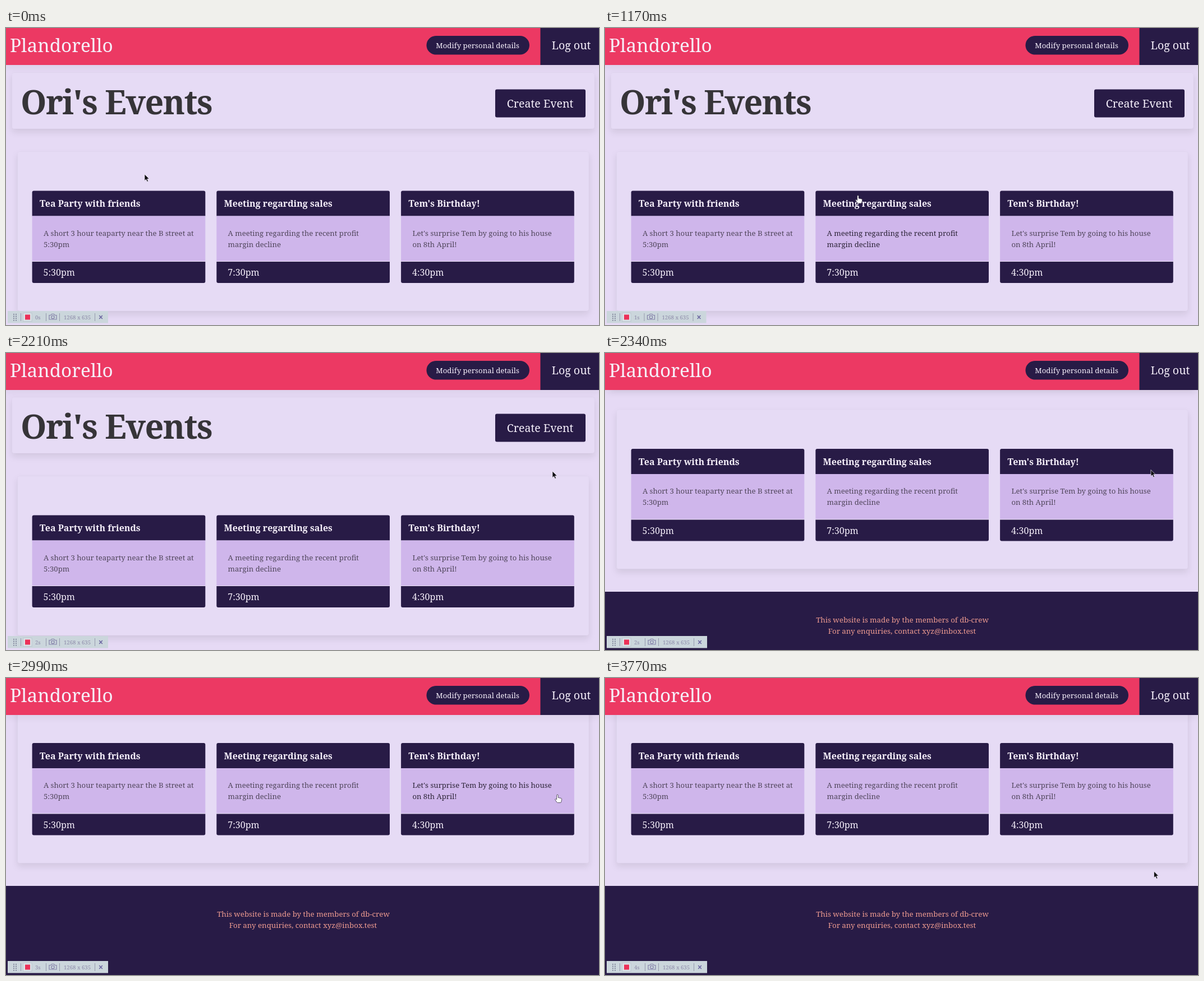
An HTML page for the animation above (4.03 s loop, 1057 by 530 pixels).

```html
<!DOCTYPE html>
<html lang="en">
<head>
<meta charset="utf-8">
<title>Event dashboard</title>
<style>
  html, body { margin: 0; width: 100%; height: 100%; overflow: hidden; background: #e6daf5; }
  svg { display: block; width: 100vw; height: 100vh; }
  text { font-family: "Noto Serif", serif; fill: #f6f0fb; white-space: pre; }
  .dark { fill: #281b46; }
  .bold { font-weight: 700; }
  .panel { fill: #e6dbf5; stroke: rgba(10,10,10,.02); filter: drop-shadow(0 6px 6px rgba(10,10,10,.09)); }
  .bar { filter: drop-shadow(0 5px 6px rgba(10,10,10,.05)); }
  .body text { fill: #50465b; font-size: 13.12px; }
  .body.hover text { fill: #2d2538; }
  .foot { fill: #ee9b90; font-size: 13.25px; text-anchor: middle; }
  #tools text { fill: #8c89a8; font-size: 9.6px; }
</style>
</head>
<body>
<svg id="stage" viewBox="0 0 1057 530" preserveAspectRatio="none">
  <rect width="1057" height="530" fill="#e6daf5"/>

  <g id="page">
    <rect class="panel" x="10.5" y="79.5" width="1038.5" height="100.5" rx="4"/>
    <text class="bold" x="26" y="153.5" font-size="59" letter-spacing="-1.5" style="fill:#363438">Ori's Events</text>
    <rect id="create" class="dark" x="872" y="109.5" width="161" height="50" rx="3"/>
    <text x="892.7" y="141.5" font-size="19.6">Create Event</text>
    <rect class="panel" x="20.5" y="220.5" width="1018.5" height="284.5" rx="4"/>
    <g id="cards"></g>
    <rect class="dark" y="545.5" width="1057" height="240"/>
    <text class="foot" x="530" y="600.5">This website is made by the members of db-crew</text>
    <text class="foot" x="529.5" y="620.5">For any enquiries, contact xyz@inbox.test</text>
  </g>

  <rect class="bar" width="1057" height="66" fill="#ec3963"/>
  <text x="7" y="43" font-size="33.3">Plandorello</text>
  <rect class="dark" x="749.5" y="14" width="183.5" height="33.5" rx="16.75"/>
  <text x="766.3" y="35.7" font-size="13.25">Modify personal details</text>
  <rect class="dark" x="952.5" width="104.5" height="66"/>
  <text x="972.7" y="38.2" font-size="19.6">Log out</text>

  <g id="tools">
    <rect id="strip" x="3" y="505" width="179" height="21.5" fill="#cbd6dc"/>
    <path d="M14 510v13M18 510v13" stroke="#777b92" stroke-width="1.8" stroke-dasharray="1.8 1.8"/>
    <path d="M26.5 509v14" stroke="#9699ae"/>
    <rect x="30.5" y="508.5" width="15.5" height="15" fill="#dbe2e7" stroke="#bcc6d0"/>
    <rect x="34" y="511.5" width="9" height="9" fill="#ec3158"/>
    <text id="secs" x="52" y="519.7"></text>
    <g id="rest">
      <path d="M71.5 509v14M95.5 509v14M158.5 509v14" stroke="#9699ae"/>
      <g fill="none" stroke="#8481a9" stroke-width="1.2">
        <path d="M77 512.5h3l1.5-2h4l1.5 2h3v7.5h-13z"/>
        <circle cx="83.5" cy="516" r="2.7"/>
      </g>
      <text x="103" y="519.7">1268 x 635</text>
      <path d="M166.2 513l5.6 6M171.8 513l-5.6 6" stroke="#6b66a1" stroke-width="1.6"/>
    </g>
  </g>

  <path id="arrow" d="M0 0v11.5l2.6-2.4 2 4.2 1.9-.9-1.9-4.1h3.6z" fill="#0c0a10" stroke="#f3eef8" stroke-width=".7"/>
  <path id="hand" d="M-1.4 1q0-1.3 1.3-1.3t1.3 1.3v4l5 1q1.4.4 1.4 1.8l-.8 4.2q-.2 2-1.8 2h-4.6q-1.2 0-1.8-1.2l-3-4.6q.5-1.6 2.2-.6l.8 1z" fill="#fff" stroke="#3a3344" stroke-width=".8"/>
</svg>
<script>
const LOOP = 4030, STEP = 130;
const HELD = [520, 780, 2860, 3640, 3900];
const CARD = { top: 290.5, width: 308.7, height: 164.5 };
const $ = id => document.getElementById(id);

const events = [
  { x: 46.6, title: "Tea Party with friends", lines: ["A short 3 hour teaparty near the B street at", "5:30pm"], time: "5:30pm" },
  { x: 375.3, title: "Meeting regarding sales", lines: ["A meeting regarding the recent profit", "margin decline"], time: "7:30pm" },
  { x: 704.1, title: "Tem's Birthday!", lines: ["Let's surprise Tem by going to his house", "on 8th April!"], time: "4:30pm" }
];

// time, x, y of the pointer tip
const pointer = [
  [0, 247, 261], [390, 232, 288], [650, 222, 304], [910, 300, 308], [1040, 390, 304],
  [1170, 451, 299], [1300, 600, 298], [1430, 740, 294], [1560, 830, 240], [1690, 915, 165],
  [1820, 944.5, 138], [2080, 948, 146], [2210, 974, 211], [2340, 973, 208.5], [2730, 973, 208.5],
  [2990, 983, 208.5], [3250, 981, 250], [3510, 979, 325], [3770, 978.5, 345]
];
const scroll = [[0, 0], [2080, 0], [2210, 1], [2340, 119.5], [2470, 155], [2600, 171], [2730, 174.5]];

function cardMarkup({ x, title, lines, time }) {
  const w = CARD.width;
  return `<g transform="translate(${x} ${CARD.top})">
    <path class="dark" d="M0 45V3q0-3 3-3h${w - 6}q3 0 3 3v42z"/>
    <rect y="45" width="${w}" height="80.5" fill="#cfb6eb"/>
    <rect y="125.5" width="${w}" height="1" fill="#eadff5"/>
    <path class="dark" d="M0 126.5v35q0 3 3 3h${w - 6}q3 0 3-3v-35z"/>
    <text class="bold" x="13.3" y="28.8" font-size="15.97">${title}</text>
    <g class="body">${lines.map((s, i) => `<text x="20.3" y="${80 + 20 * i}">${s}</text>`).join("")}</g>
    <text x="20" y="151.5" font-size="16">${time}</text>
  </g>`;
}

$("cards").innerHTML = events.map(cardMarkup).join("");
const bodies = [...document.querySelectorAll(".body")];

function sample(track, t) {
  const i = track.findIndex(p => p[0] > t);
  if (i < 0) return track[track.length - 1].slice(1);
  const a = track[i - 1], b = track[i], k = (t - a[0]) / (b[0] - a[0]);
  return a.slice(1).map((v, j) => v + (b[j + 1] - v) * k);
}

const inside = (px, py, x, y, w, h) => px >= x && px <= x + w && py >= y && py <= y + h;

function place(el, x, y, shown) {
  el.setAttribute("transform", `translate(${x} ${y})`);
  el.setAttribute("visibility", shown ? "visible" : "hidden");
}

function draw(time) {
  let t = Math.floor(time % LOOP / STEP) * STEP;
  if (HELD.includes(t)) t -= STEP;

  const [top] = sample(scroll, t);
  const [x, y] = sample(pointer, t);
  $("page").setAttribute("transform", `translate(0 ${-top})`);

  // hover does not update while the page scrolls
  const scrolling = t >= 2210 && t < 2730;
  const py = y + top;
  const onCard = scrolling ? -1 : events.findIndex(e => inside(x, py, e.x, CARD.top, CARD.width, CARD.height));
  const onButton = !scrolling && inside(x, py, 872, 109.5, 161, 50);
  bodies.forEach((b, i) => b.classList.toggle("hover", i === onCard));
  $("create").style.fill = onButton ? "#20143a" : "";

  const link = onCard >= 0 || onButton;
  place($("arrow"), x, y, !link);
  place($("hand"), x, y, link);

  const secs = Math.floor((t + 350) / 1000);
  const shift = secs === 1 ? -1.5 : 0;
  $("secs").textContent = secs + "s";
  $("strip").setAttribute("width", 179 + shift);
  $("rest").setAttribute("transform", `translate(${shift} 0)`);
}

const start = performance.now();
function tick() {
  draw(performance.now() - start);
  requestAnimationFrame(tick);
}
tick();
</script>
</body>
</html>
```
